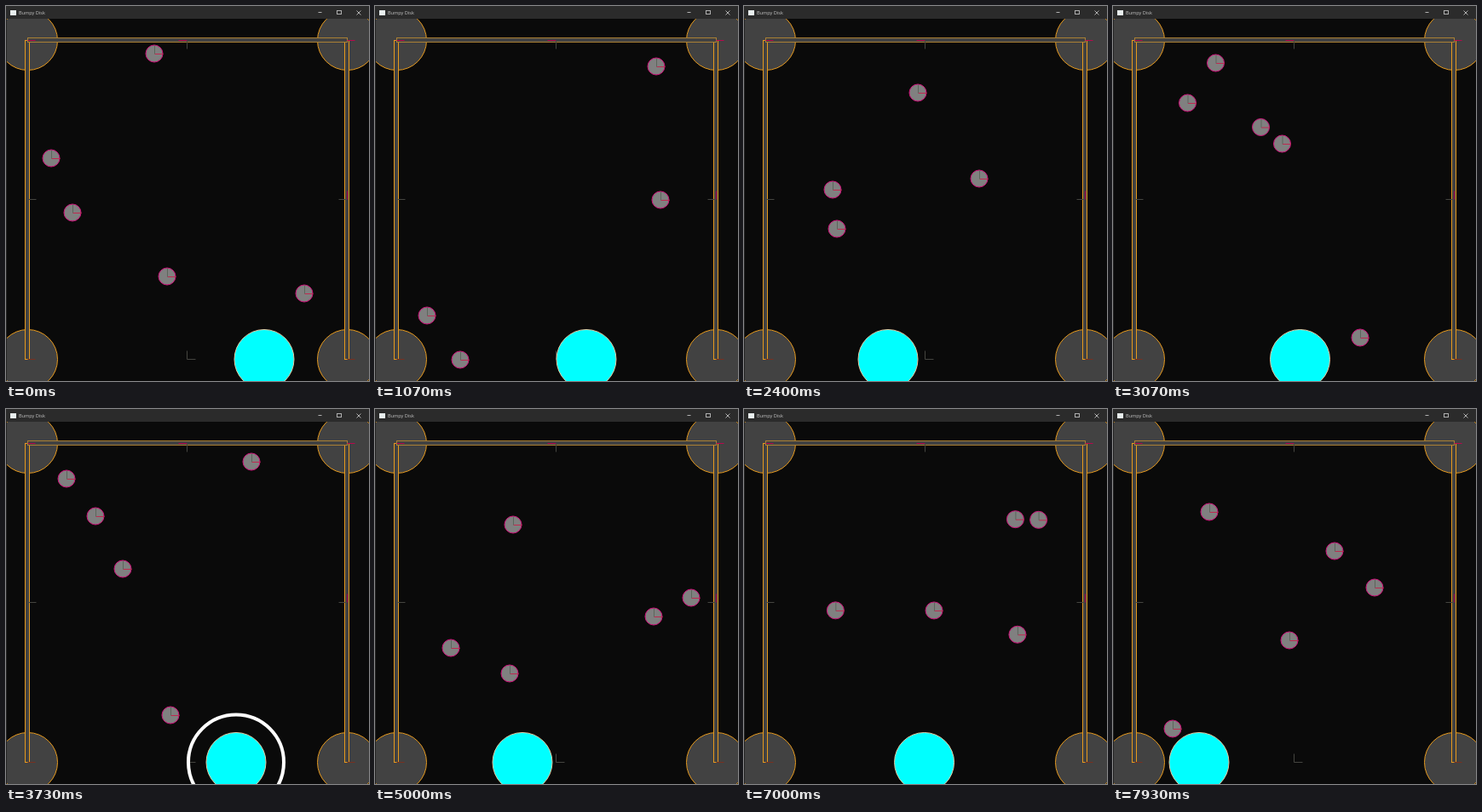
Recreate the animation shown at these times as an HTML page with a canvas. Size 426 by 441 pixels, loop 8000 ms.

```html
<!DOCTYPE html>
<html lang="en">
<head>
<meta charset="utf-8">
<title>Bumpy Disk</title>
<style>
  html, body { margin: 0; width: 100%; height: 100%; overflow: hidden; background: #0a0a0a; }
  canvas { display: block; }
</style>
</head>
<body>
<canvas id="stage" width="426" height="441"></canvas>
<script>
const ctx = document.getElementById('stage').getContext('2d');
const LOOP_MS = 8000, FPS = 15;
const LEFT = 25, RIGHT = 400, TOP = 40, BOTTOM = 415, MIDDLE_X = 212, MIDDLE_Y = 227;
const GREY = '#424242', ORANGE = '#e69a1e', CRIMSON = '#b8084e', DIM = '#454540';

// Positions are given at shared beats (in ticks) and run straight in between.
const beats = [0, 16, 36, 56, 75, 90, 119];
const paddlePath = [[303], [248], [169], [270], [173], [330], [101]];
const pulses = [53, 84.5];

// Paths ignore the walls; fold() reflects them back into the arena.
const balls = [
  { path: [[174,56], [335,228], [498,203], [703,82], [860,-30], [1029,-152], [1265,-166]] },
  { path: [[53,179], [330,71], [570,4], [803,-20], [1025,-138], [1091,-228], [1212,167]] },
  { path: [[78,243], [61,364], [104,216], [137,-82], [158,-205], [160,-430]] },
  { path: [[189,318], [160,530]] },
  { path: [[350,338], [100,416], [40,560]] },
  { first: 1, path: [[38,425], [109,262], [288,62], [371,-116], [402,-360]] },
  { first: 2, path: [[387,420], [193,360], [-13,281], [-186,361], [113,121]] },
  { first: 4, path: [[387,45], [387,88], [70,376]] },
  { first: 5, path: [[387,45], [307,210]] }
];

function along(path, tick, first = 0) {
  const beat = Math.max(1, beats.findIndex(b => tick <= b));
  const from = path[beat - 1 - first], to = path[beat - first];
  if (!from || !to) return null;
  const k = (tick - beats[beat - 1]) / (beats[beat] - beats[beat - 1]);
  return from.map((v, n) => v + (to[n] - v) * k);
}

function fold([x, y]) {
  const min = LEFT + 13, span = RIGHT - 13 - min, roof = TOP + 13;
  const period = span * 2;
  const offset = ((x - min) % period + period) % period;
  return [min + Math.min(offset, period - offset), roof + Math.abs(y - roof)];
}

function circle(x, y, r, fill, stroke, width = 1) {
  ctx.beginPath();
  ctx.arc(x, y, r, 0, Math.PI * 2);
  if (fill) { ctx.fillStyle = fill; ctx.fill(); }
  if (stroke) { ctx.strokeStyle = stroke; ctx.lineWidth = width; ctx.stroke(); }
}

function line(x, y, dx, dy, color) {
  ctx.strokeStyle = color;
  ctx.lineWidth = 1;
  ctx.beginPath();
  ctx.moveTo(x + .5, y + .5);
  ctx.lineTo(x + dx + .5, y + dy + .5);
  ctx.stroke();
}

function wall(x, y, w, h, stroke) {
  ctx.fillStyle = GREY;
  ctx.fillRect(x, y, w, h);
  ctx.strokeStyle = stroke;
  ctx.lineWidth = 1;
  ctx.strokeRect(x, y, w, h);
}

function drawBall([x, y]) {
  circle(x, y, 10, '#808080', '#d0107a');
  line(x, y, 10, 0, '#c02850');
  line(x, y, 0, -10, '#5c665c');
}

function drawArena() {
  const size = RIGHT - LEFT;
  for (const x of [LEFT, RIGHT]) {
    for (const y of [TOP, BOTTOM]) circle(x + .5, y + .5, 35, GREY, ORANGE);
    wall(x - 2.5, TOP + .5, 5, size, ORANGE);
  }
  wall(LEFT + .5, TOP - 2.5, size, 5, '#aa8034');
  for (const x of [LEFT, RIGHT]) {
    line(x, TOP, 9, 0, CRIMSON);
    line(x, BOTTOM, 9, 0, '#783020');
  }
  line(MIDDLE_X, TOP, -10, 0, CRIMSON);
  line(MIDDLE_X, TOP, 0, 10, DIM);
  line(LEFT, MIDDLE_Y, 10, 0, DIM);
  line(RIGHT, MIDDLE_Y, -10, 0, DIM);
  line(RIGHT, MIDDLE_Y, 0, -10, CRIMSON);
  line(MIDDLE_X, BOTTOM, 0, -10, DIM);
  line(MIDDLE_X, BOTTOM, 10, 0, DIM);
}

function drawTitleBar() {
  ctx.fillStyle = '#2b2b2b';
  ctx.fillRect(0, 0, 426, 15);
  ctx.fillStyle = '#e8eeee';
  ctx.fillRect(5, 5, 7, 6);
  ctx.fillStyle = '#c4c4c4';
  ctx.font = '5.6px "Open Sans", sans-serif';
  ctx.fillText('Bumpy Disk', 15, 10);
  line(366, 7, 4, 0, '#b0b0b0');
  ctx.strokeRect(388.5, 5.5, 5, 4);
  line(411, 5, 5, 5, '#b0b0b0');
  line(416, 5, -5, 5, '#b0b0b0');
  line(0, 15, 0, 426, '#252525');
}

function draw(now) {
  const tick = Math.min(119, Math.floor((now % LOOP_MS + 5) * FPS / 1000));
  ctx.fillStyle = '#0a0a0a';
  ctx.fillRect(0, 0, 426, 441);
  for (const { path, first } of balls) {
    const position = along(path, tick, first);
    if (position) drawBall(fold(position));
  }
  drawArena();
  const [paddleX] = along(paddlePath, tick);
  circle(paddleX, BOTTOM + .5, 35, '#00ffff', '#e6c8a0');
  for (const start of pulses) {
    const age = tick - start;
    const radius = 35 + age * 7;
    if (age >= 0 && age < 5.7) circle(paddleX, BOTTOM + .5, radius, null, '#fff', radius / 14);
  }
  drawTitleBar();
}

const started = performance.now();
function loop() {
  draw(performance.now() - started);
  requestAnimationFrame(loop);
}
loop();
</script>
</body>
</html>
```
